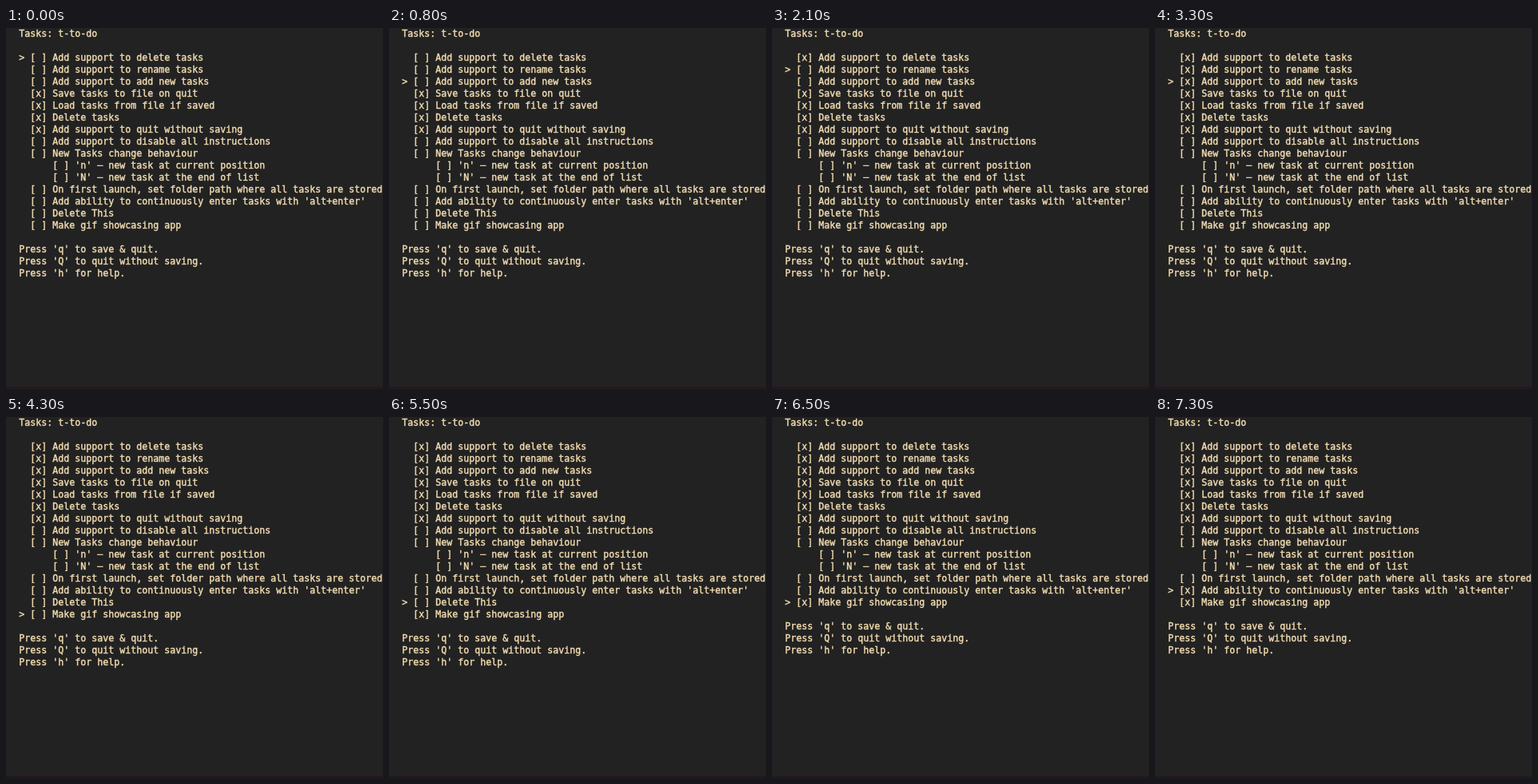
An HTML page for the animation above (8 s loop, 472 by 452 pixels).

```html
<!DOCTYPE html>
<html lang="en">
<head>
<meta charset="utf-8">
<title>t-to-do</title>
<style>
  html, body { margin: 0; width: 100%; height: 100%; overflow: hidden; background: #222; }
  pre {
    position: absolute; left: 16.3px; top: 0; margin: 0;
    font: 11.64px/15px "DejaVu Sans Mono", monospace;
    color: #f2dcb0;
    -webkit-text-stroke: 0.4px #f2dcb0;
  }
  .edge { position: absolute; left: 0; right: 0; top: 449px; height: 3px; background: #24191f; }
</style>
</head>
<body>
<pre id="screen"></pre>
<div class="edge"></div>
<script>
const LOOP = 8000;
const screen = document.getElementById('screen');

const startTasks = [
  '[ ] Add support to delete tasks',
  '[ ] Add support to rename tasks',
  '[ ] Add support to add new tasks',
  '[x] Save tasks to file on quit',
  '[x] Load tasks from file if saved',
  '[x] Delete tasks',
  '[x] Add support to quit without saving',
  '[ ] Add support to disable all instructions',
  '[ ] New Tasks change behaviour',
  "    [ ] 'n' – new task at current position",
  "    [ ] 'N' – new task at the end of list",
  '[ ] On first launch, set folder path where all tasks are stored',
  "[ ] Add ability to continuously enter tasks with 'alt+enter'",
  '[ ] Delete This',
  '[ ] Make gif showcasing app'
];

const help = [
  "Press 'q' to save & quit.",
  "Press 'Q' to quit without saving.",
  "Press 'h' for help."
];

const actions = {
  down: s => s.cursor++,
  up: s => s.cursor--,
  end: s => s.cursor = s.tasks.length - 1,
  check: s => s.tasks[s.cursor] = s.tasks[s.cursor].replace('[ ]', '[x]'),
  remove: s => s.tasks.splice(s.cursor, 1)
};

// Key presses: time in ms, action
const keys = [
  [600, 'down'], [800, 'down'], [1500, 'up'], [1600, 'up'], [1800, 'check'],
  [2100, 'down'], [2300, 'check'], [2500, 'down'], [2700, 'check'],
  [3700, 'end'], [5000, 'check'], [5500, 'up'], [6500, 'remove'],
  [6800, 'up'], [7000, 'check']
];

function render(time) {
  const state = { cursor: 0, tasks: [...startTasks] };
  for (const [at, action] of keys) if (time >= at) actions[action](state);
  const rows = state.tasks.map((task, i) => (i === state.cursor ? '> ' : '  ') + task);
  return ['Tasks: t-to-do', '', ...rows, '', ...help].join('\n');
}

function frame() {
  const text = render(performance.now() % LOOP);
  if (screen.textContent !== text) screen.textContent = text;
  requestAnimationFrame(frame);
}
frame();
</script>
</body>
</html>
```
